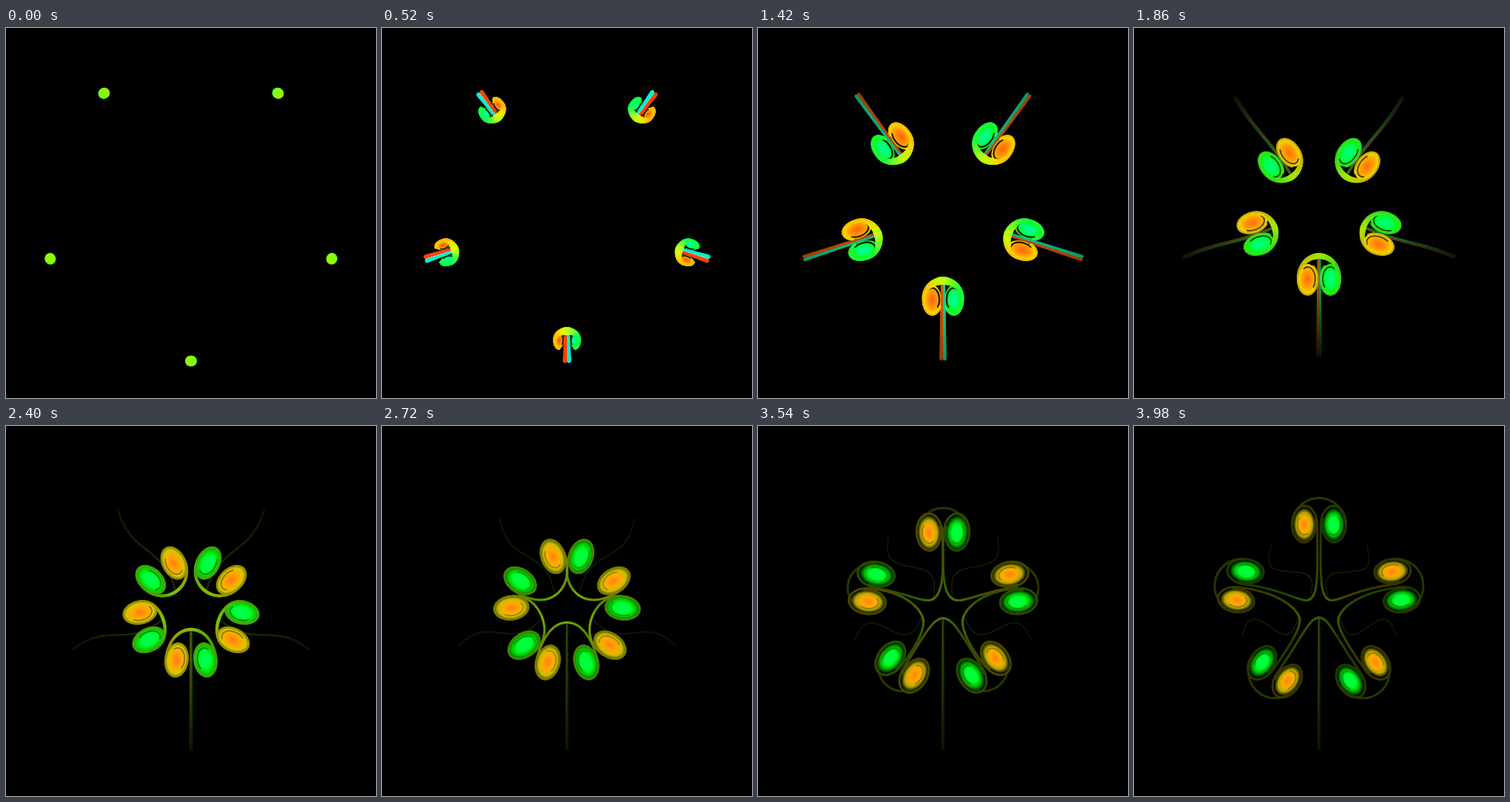
Recreate the animation shown at these times as an HTML page with a canvas. Size 500 by 500 pixels, loop 4 s.

```html
<!DOCTYPE html>
<html lang="en">
<head>
<meta charset="utf-8">
<title>Five colliding vortex jets</title>
<style>
html, body { margin: 0; width: 100%; height: 100%; overflow: hidden; background: #000; }
canvas { display: block; }
</style>
</head>
<body>
<canvas id="stage" width="500" height="500"></canvas>
<script>
const ctx = document.getElementById('stage').getContext('2d');
const LOOP = 4000, STEP = 20, C = 250, RAD = Math.PI / 180;
const MEET = 2500; // time of the closest approach
let now = 0;

const lerp = (a, b, q) => a + (b - a) * q;
const clamp = v => Math.max(0, Math.min(1, v));
const smooth = q => q * q * (3 - 2 * q);
const phase = (start, length) => clamp((now - start) / length);
const mix = (a, b, q) => a.map((v, i) => lerp(v, b[i], q));
const rgb = (c, v = 1) => 'rgb(' + c.map(x => Math.round(x * v)).join() + ')';
const polar = (deg, r) => [C + r * Math.cos(deg * RAD), C + r * Math.sin(deg * RAD)];

// Jets of the left half: nozzle direction, final tip distance, bend of the trail.
const bottom = { angle: 90, rest: 5, bend: 0 };
const side = { angle: 162, rest: 24, bend: 1 };
const upper = { angle: 234, rest: 16, bend: -1 };

// The right half mirrors these vortices with the opposite spin.
const vortices = [
  { jet: bottom, s: 1, heading: 125 },
  { jet: side, s: -1, heading: 125 },
  { jet: side, s: 1, heading: 187 },
  { jet: upper, s: -1, heading: 187 },
  { jet: upper, s: 1, heading: 270 }
];

const WARM = {
  core: [[[255, 85, 25], [255, 130, 20]], [[255, 145, 0], [255, 170, 0]], [[255, 215, 0], [225, 210, 0]]],
  sheet: [[255, 185, 0], [200, 205, 0]],
  tail: [[255, 65, 0], [150, 190, 0]]
};
const COOL = {
  core: [[[0, 255, 190], [0, 255, 80]], [[0, 255, 110], [0, 255, 45]], [[40, 255, 0], [0, 220, 0]]],
  sheet: [[0, 255, 70], [110, 220, 0]],
  tail: [[0, 240, 210], [60, 190, 0]]
};

// All sizes and brightnesses shared by the jets at the present time.
function measure() {
  const late = phase(1100, 1500), spread = phase(1900, 1700), fade = phase(1500, 2300);
  const a = 5 + 15.5 * phase(0, 1500) - 3 * phase(2200, 1780), b = a * lerp(0.6, 0.66, late);
  return {
    late, spread, fade, a, b,
    ringA: a + 8.5 * spread, ringB: b + 6 * spread,
    tipW: 3 + 11 * phase(0, 700) * (1 - late)
  };
}

// A vortex in a wedge of 36 degrees follows r * sin(5 * theta) = c.
function place(v) {
  const dt = now - MEET, c = 68 + 0.013 * Math.max(0, now - 2400);
  const pull = 1 - 0.22 * Math.sin((v.jet.angle + 36 * v.s) * RAD);
  const d = dt < 0 ? 0.1 * dt + 1e-5 * dt * dt : 75 * pull * (1 - Math.exp(-dt / 750));
  const theta = Math.atan2(c, -d) / 5 / RAD * phase(0, 700);
  v.pos = polar(v.jet.angle + v.s * theta, Math.hypot(c, d));
  v.rot = lerp(v.jet.angle, v.heading, smooth(phase(1700, 2200)));
}

function tipRadius(jet, late) {
  const x = 186 * (1 - now / 2400);
  return 6 + (x + Math.hypot(x, 35)) / 2 + (jet.rest - 6) * late * late;
}

function segment(p, q, width, color) {
  ctx.lineWidth = width;
  ctx.strokeStyle = color;
  ctx.beginPath();
  ctx.moveTo(...p);
  ctx.lineTo(...q);
  ctx.stroke();
}

function cubic(p, q) {
  const r = 1 - q;
  return [0, 1].map(k => r * r * r * p[0][k] + 3 * r * r * q * p[1][k] + 3 * r * q * q * p[2][k] + q * q * q * p[3][k]);
}

function drawCore(v, tones, m) {
  const [mid, rim, edge] = tones.core.map(c => mix(c[0], c[1], m.late));
  ctx.save();
  ctx.translate(...v.pos);
  ctx.rotate(v.rot * RAD);
  ctx.scale(1, v.s);
  ctx.save();
  const glow = lerp(1, 1.3, m.spread);
  ctx.scale(m.a * glow, m.b * glow);
  const g = ctx.createRadialGradient(0, 0, 0, 0, 0, 1);
  g.addColorStop(0, rgb(mid));
  g.addColorStop(0.55 / glow, rgb(rim));
  g.addColorStop(0.93 / glow, rgb(edge, lerp(1, 0.8, m.spread)));
  g.addColorStop(1, rgb(edge, lerp(1, 0, m.spread)));
  ctx.fillStyle = g;
  ctx.beginPath();
  ctx.arc(0, 0, 1, 0, 7);
  ctx.fill();
  ctx.restore();
  // dark fluid rolled into the core
  ctx.globalCompositeOperation = 'source-over';
  ctx.globalAlpha = lerp(1, 0.3, m.late);
  ctx.strokeStyle = '#000';
  ctx.lineWidth = 0.1 + 2.5 * phase(0, 900) * lerp(1, 0.6, m.late);
  ctx.beginPath();
  ctx.ellipse(0, 0, m.a * 0.8, m.b * 0.8, 0, 310 * RAD, 150 * RAD, true);
  ctx.stroke();
  ctx.restore();
}

// Thin layer of dye running from the tip of the jet around the vortex.
function drawSheet(v, tones, m) {
  const r = v.rot * RAD, u = [Math.cos(r), Math.sin(r)], n = [-u[1] * v.s, u[0] * v.s];
  const ring = (deg, k) => {
    const x = m.ringA * k * Math.cos(deg * RAD), y = m.ringB * k * Math.sin(deg * RAD);
    return [0, 1].map(i => v.pos[i] + u[i] * x + n[i] * y);
  };
  const w0 = m.tipW, w1 = Math.min(w0, lerp(4, 3, m.late));
  const v0 = lerp(1, 0.36, m.fade), v1 = lerp(1, 0.26, m.fade);
  const tip = polar(v.jet.angle, tipRadius(v.jet, m.late) + w0 / 2), join = ring(90, 1);
  const d = Math.hypot(join[0] - tip[0], join[1] - tip[1]), out = (v.jet.angle + 90 * v.s) * RAD;
  const straight = phase(2200, 1500), k0 = lerp(0.39, 0.14, straight) * d, k1 = lerp(0.39, 0.62, straight) * d;
  const curve = [tip, [tip[0] + k0 * Math.cos(out), tip[1] + k0 * Math.sin(out)],
    [join[0] - u[0] * k1, join[1] - u[1] * k1], join];
  const lime = [170, 255, 0], tint = mix(tones.sheet[0], tones.sheet[1], m.late);

  let p = tip;
  for (let i = 1; i <= 24; i++) {
    const q = i / 24, next = cubic(curve, q);
    segment(p, next, lerp(w0, w1, q), rgb(mix(lime, tint, clamp(q * 1.6)), lerp(v0, v1, q)));
    p = next;
  }
  const turns = lerp(0.25, 1.05, m.late);
  for (let i = 1; i <= 40; i++) {
    const q = i / 40, next = ring(90 - 360 * turns * q, 1 - 0.12 * q * m.spread);
    segment(p, next, w1, rgb(tint, v1));
    p = next;
  }
}

function drawTail(v, tones, m) {
  const jet = v.jet, drawn = jet.bend ? 0.036 * Math.max(0, now - 1860) : 0;
  const from = 200 - 14 * m.late - drawn, to = Math.min(from, tipRadius(jet, m.late) + m.tipW);
  const bend = jet.bend * 17 * phase(1700, 2000), thin = jet.bend ? lerp(1, 0.5, m.late) : 1;
  const width = lerp(11, 4.2, m.late) * thin;
  const v0 = lerp(1, 0.1, phase(1150, 700)), v1 = lerp(1, 0.36, phase(1200, 1500)) * thin;
  const tint = mix(tones.tail[0], tones.tail[1], m.late);
  const dir = jet.angle * RAD, along = [Math.cos(dir), Math.sin(dir)];
  let p = null;
  for (let i = 0; i <= 36; i++) {
    const q = i / 36, r = lerp(from, to, q), w = width * lerp(1, 0.65, q);
    const off = bend * Math.sin(2 * Math.PI * q) + v.s * w / 4;
    const next = [C + along[0] * r - along[1] * off, C + along[1] * r + along[0] * off];
    if (p) segment(p, next, w * 0.5, rgb(tint, lerp(v0, v1, clamp(q * 1.3))));
    p = next;
  }
}

// Round front shared by the two vortices of a departing pair.
function drawCap(a, b, dir) {
  const v = 0.25 * phase(3050, 450);
  if (!v) return;
  ctx.lineWidth = 3;
  ctx.strokeStyle = rgb([160, 215, 0], v);
  ctx.beginPath();
  ctx.arc((a[0] + b[0]) / 2, (a[1] + b[1]) / 2, 30 + 6 * phase(3050, 900), (dir - 90) * RAD, (dir + 90) * RAD);
  ctx.stroke();
}

function drawNozzle(deg) {
  const r = 7.5 * (1 - phase(40, 420));
  if (r < 0.3) return;
  const p = polar(deg, 200), n = [-Math.sin(deg * RAD), Math.cos(deg * RAD)];
  for (const [off, color] of [[0.8, '#ff8000'], [-0.8, '#00ff90'], [0, '#88ff00']]) {
    ctx.fillStyle = color;
    ctx.beginPath();
    ctx.arc(p[0] + n[0] * off, p[1] + n[1] * off, r - 0.2, 0, 7);
    ctx.fill();
  }
}

function bothSides(draw) {
  for (const mirror of [1, -1]) {
    ctx.save();
    ctx.translate(C, 0);
    ctx.scale(mirror, 1);
    ctx.translate(-C, 0);
    draw(mirror);
    ctx.restore();
  }
}

function render() {
  ctx.globalCompositeOperation = 'source-over';
  ctx.fillStyle = '#000';
  ctx.fillRect(0, 0, 500, 500);
  ctx.globalCompositeOperation = 'lighten';
  ctx.lineCap = 'round';
  const m = measure();
  vortices.forEach(place);
  for (const part of [drawCore, drawSheet, drawTail]) {
    bothSides(mirror => {
      for (const v of vortices) part(v, v.s * mirror > 0 ? WARM : COOL, m);
    });
  }
  const [low, lowOut, left, leftOut, top] = vortices.map(v => v.pos);
  drawCap(top, [500 - top[0], top[1]], 270);
  bothSides(() => {
    drawCap(low, lowOut, 125);
    drawCap(left, leftOut, 187);
  });
  ctx.globalCompositeOperation = 'source-over';
  for (let i = 0; i < 5; i++) drawNozzle(90 + 72 * i);
}

function frame() {
  now = Math.floor(performance.now() % LOOP / STEP) * STEP;
  render();
  requestAnimationFrame(frame);
}
frame();
</script>
</body>
</html>
```
